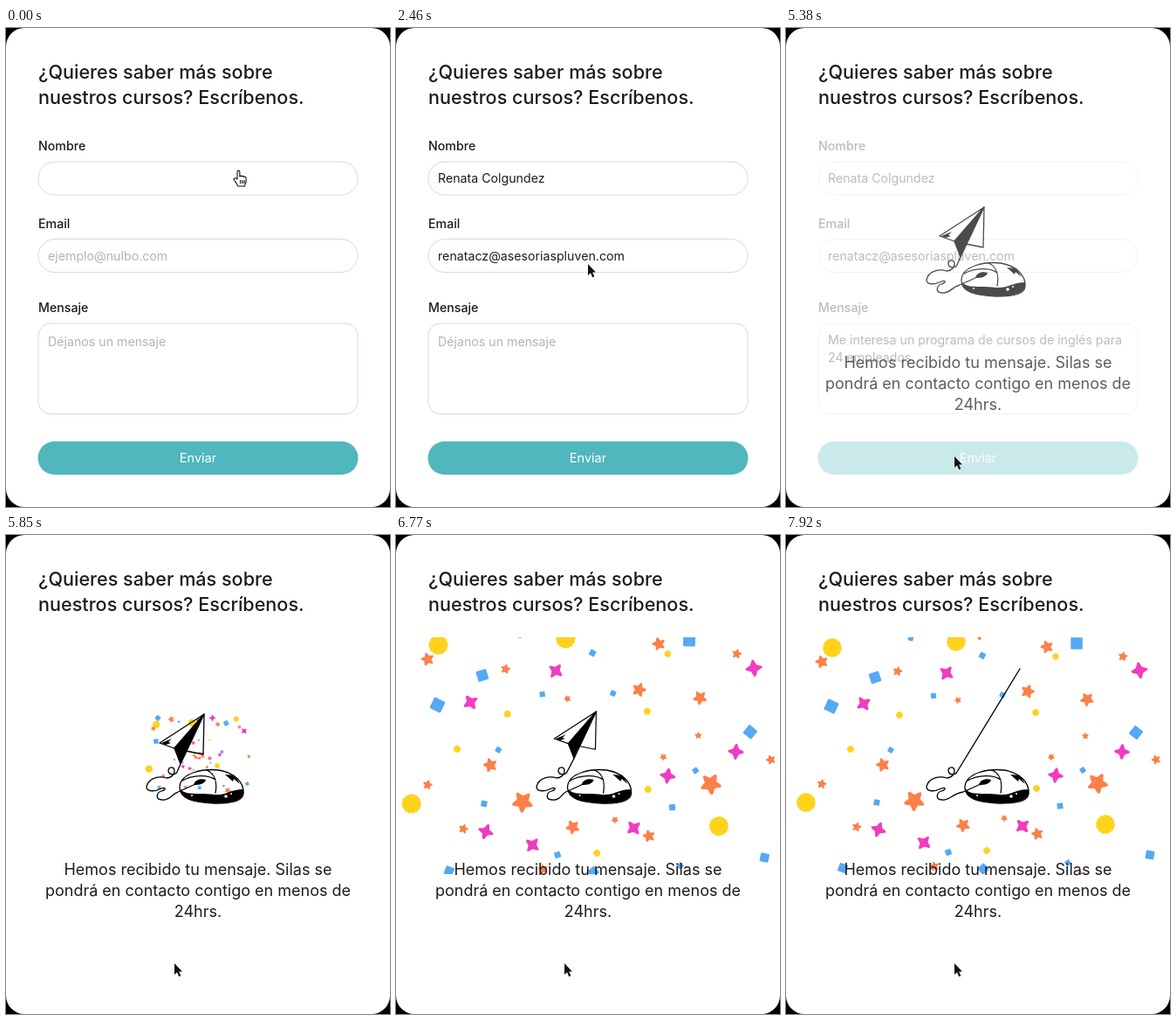
These frames come from a looping animation (440 px wide and 548 px high, 8000 ms). An HTML page:

```html
<!DOCTYPE html>
<html lang="es">
<head>
<meta charset="utf-8">
<style>
  html, body { margin: 0; width: 100%; height: 100%; overflow: hidden; background: #000; }
  svg { display: block; width: 100%; height: 100%; }
  text { font: 14.2px Inter, "Open Sans", sans-serif; fill: #1c1c1e; }
  .title { font-size: 21.6px; font-weight: 500; }
  .label { font-weight: 500; }
  .hint { fill: #b3b3b3; }
  .send { font-size: 14.5px; fill: #fff; text-anchor: middle; }
  .thanks { font-size: 18px; text-anchor: middle; }
  .field { fill: #fff; stroke: #d9d9d9; }
  .ink { fill: none; stroke: #000; stroke-width: 1.3; stroke-linejoin: round; stroke-linecap: round; }
  .solid { fill: #000; }
</style>
</head>
<body>
<svg viewBox="0 0 440 548">
  <defs><clipPath id="artClip"><rect y="117" width="440" height="271"/></clipPath></defs>
  <rect width="440" height="548" rx="21" fill="#fff"/>
  <text class="title" x="37" y="58">¿Quieres saber más sobre</text>
  <text class="title" x="37" y="87">nuestros cursos? Escríbenos.</text>

  <g id="form">
    <text class="label" x="37" y="140">Nombre</text>
    <text class="label" x="37" y="229">Email</text>
    <text class="label" x="37" y="325">Mensaje</text>
    <rect class="field" x="37" y="153" width="366" height="38" rx="19"/>
    <rect class="field" x="37" y="241.5" width="366" height="38" rx="19"/>
    <rect class="field" x="37" y="338" width="366" height="103.500" rx="14"/>
    <text id="name" x="48" y="177">Renata Colgundez</text>
    <text id="emailHint" class="hint" x="48" y="265.500">ejemplo@nulbo.com</text>
    <text id="email" x="48" y="265.500">renatacz@asesoriaspluven.com</text>
    <text id="messageHint" class="hint" x="48" y="363.500">Déjanos un mensaje</text>
    <g id="message">
      <text x="48" y="362">Me interesa un programa de cursos de inglés para</text>
      <text x="48" y="381.500">24 empleados.</text>
    </g>
    <rect x="36.500" y="473" width="367" height="38" rx="19" fill="#4fb7bd"/>
    <text class="send" x="220" y="497">Enviar</text>
  </g>

  <g id="success">
    <g clip-path="url(#artClip)">
      <g id="confetti"></g>
      <path id="cord" class="ink"/>
      <g id="plane">
        <path class="ink" d="M227 205 176 238 193 244ZM227 205 226 251 206 247"/>
        <path class="ink solid" d="M227 205 193 244 200 262Z"/>
        <path class="solid" d="M178 238 190 233 186 237 189 238 183 240Z"/>
      </g>
      <g id="mouse">
        <path class="ink" d="M205 288C206 272 232 267 250 269 268 272 279 283 278 296 277 304 268 307 245 307 222 306 204 302 205 288ZM236 269C246 273 248 284 246 295M208 281C220 274 238 274 246 280"/>
        <path class="solid" d="M206 291C214 299 226 294 245 297 258 298 263 291 278 291 280 303 268 307 245 307 222 306 206 303 206 291Z"/>
        <path class="solid" d="M221 286C222 280 229 278 235 280 234 285 227 286 221 286ZM257 274 268 275 274 285 267 279 266 282Z"/>
        <g fill="#fff">
          <circle cx="258" cy="299" r="1.800"/><circle cx="264" cy="296" r="1"/><circle cx="219" cy="298" r="1"/>
        </g>
      </g>
    </g>
    <text class="thanks" x="220" y="389">Hemos recibido tu mensaje. Silas se</text>
    <text class="thanks" x="220" y="413">pondrá en contacto contigo en menos de</text>
    <text class="thanks" x="220" y="437">24hrs.</text>
  </g>

  <g id="cursor">
    <g id="hand" fill="#fff" stroke="#111" stroke-width="1.100" stroke-linejoin="round">
      <path d="M-3 1V-7.500a1.400 1.400 0 0 1 2.800 0V-2a1.400 1.400 0 0 1 2.600 0 1.300 1.300 0 0 1 2.400.6 1.300 1.300 0 0 1 2.300.8V3c0 3-1.600 4-1.600 6H-2.300C-3 6-6 3.500-6.800 1.200-7.200-.6-4.600-.8-3 1Z"/>
      <path d="M.5 2V6M2.800 2V6M5 2V6"/>
    </g>
    <path id="arrow" d="M-3-8V5l3-2.800 2.200 5 2.200-1L2.200 1.400H6Z" fill="#111" stroke="#fff" stroke-width="1" paint-order="stroke"/>
  </g>
</svg>

<script>
const LOOP = 8000, BURST_START = 5540, BURST_LENGTH = 1310;
const CENTER = { x: 220, y: 252 };
const $ = id => document.getElementById(id);
const show = (id, visible) => $(id).setAttribute('visibility', visible ? 'inherit' : 'hidden');
const move = (el, x, y, rest = '') => el.setAttribute('transform', `translate(${x} ${y}) ${rest}`);
const linear = k => k;
const smooth = k => (1 - Math.cos(Math.PI * k)) / 2;

// Value at time t along [time, value] keys
function track(t, keys, ease = linear) {
  if (t <= keys[0][0]) return keys[0][1];
  for (let i = 1; i < keys.length; i++) {
    const [t0, a] = keys[i - 1], [t1, b] = keys[i];
    if (t < t1) return a + (b - a) * ease((t - t0) / (t1 - t0));
  }
  return keys[keys.length - 1][1];
}

function starPath(points, inner) {
  const corners = Array.from({ length: points * 2 }, (_, i) => {
    const a = i * Math.PI / points, r = i % 2 ? inner : 8.5;
    return `${(r * Math.sin(a)).toFixed(2)} ${(-r * Math.cos(a)).toFixed(2)}`;
  });
  return `M${corners.join('L')}Z`;
}

const KINDS = {
  yellow: { color: '#ffd21c', path: starPath(14, 7.8) },
  blue: { color: '#55a9f5', path: starPath(4, 6) },
  orange: { color: '#fb8148', path: starPath(5, 4) },
  pink: { color: '#f03cc0', path: starPath(4, 3.6) }
};

// Each wave: its spread over time, then [kind, radius, "x,y ..."] at full spread
const WAVES = [
  { spread: [0, .285, .503, .93, 1, 1.04], pieces: [
    ['yellow', 11, '53,129 195,122 23,306'], ['yellow', 8, '373,107'],
    ['blue', 9, '52,196 333,124 59,103'], ['blue', 6.5, '417,366 226,382 65,381'], ['blue', 4, '143,118 323,375'],
    ['orange', 7.5, '41,145 299,128 221,113'], ['orange', 9, '113,108 339,393'],
    ['orange', 5.5, '386,139 424,257 81,334 170,379'], ['pink', 9.5, '405,155 278,103']] },
  { spread: [0, .15, .37, .912, 1, 1.04], pieces: [
    ['yellow', 11, '366,331'], ['yellow', 3.8, '309,139'],
    ['blue', 8, '102,163 401,226'], ['blue', 4.5, '225,138 104,306 314,310 186,363'],
    ['orange', 5.5, '128,156 41,285'], ['orange', 7, '288,342'],
    ['pink', 8.8, '89,193 184,158 385,248 309,275 106,337 158,352']] },
  { spread: [0, .04, .2, .895, 1, 1.04], pieces: [
    ['yellow', 4, '130,206 74,245 286,203 287,290 230,361'],
    ['blue', 4, '248,183 169,184 120,246 340,269'],
    ['orange', 8, '277,179 345,188 111,263 203,332'], ['orange', 12, '147,304 357,284'],
    ['orange', 4, '197,189 343,230 304,254 250,324'], ['pink', 8.8, '271,333']] }
];
const AGES = [0, 310, 530, 840, 1070, BURST_LENGTH];

const confetti = [];
for (const wave of WAVES) {
  const keys = wave.spread.map((s, i) => [AGES[i], s]);
  for (const [kind, radius, spots] of wave.pieces) for (const spot of spots.split(' ')) {
    const [x, y] = spot.split(',').map(Number);
    const { color, path } = KINDS[kind];
    const el = document.createElementNS('http://www.w3.org/2000/svg', 'path');
    const look = { d: path, fill: color, stroke: color, 'stroke-width': 3, 'stroke-linejoin': 'round' };
    for (const name in look) el.setAttribute(name, look[name]);
    $('confetti').append(el);
    confetti.push({ el, keys, radius, dx: x - CENTER.x, dy: y - CENTER.y, turn: x * 37 + y * 11 });
  }
}

function drawConfetti(t) {
  const age = (t - BURST_START) % BURST_LENGTH;
  show('confetti', t > BURST_START);
  for (const p of confetti) {
    const s = track(age, p.keys);
    const size = s < .02 ? 0 : p.radius / 10 * (.15 + .85 * s);
    move(p.el, CENTER.x + p.dx * s, CENTER.y + p.dy * s, `rotate(${p.turn + 40 * s}) scale(${size})`);
  }
}

function drawArt(t) {
  const flight = track(t, [[6650, 0], [7150, 1]], k => k * k);
  const tipX = 200 + 68 * flight, tipY = 262 - 109 * flight;
  const shift = track(t, [[5500, -4], [5850, -6], [6380, -9], [6700, -9], [7150, 0]], smooth);
  move($('plane'), tipX, tipY, `scale(${1 - flight}) translate(-200 -262)`);
  move($('mouse'), shift, 0);
  $('cord').setAttribute('d', `M${tipX} ${tipY}L196 271C194 275 187 275 186 270 186 265 193 264 193 270
    193 275 188 278 184 278 176 275 163 278 161 288 161 295 172 293 178 290 183 288 184 291 178 293
    172 295 171 303 179 303 188 304 190 296 ${203 + shift} 294L${223 + shift} 285`);
}

function drawCursor(t) {
  const x = track(t, [[1380, 268], [1850, 226.5], [2370, 226.5], [2850, 185.5], [3390, 185.5], [4150, 196]], smooth);
  const y = track(t, [[1380, 172], [1850, 270], [2370, 270], [2850, 364], [3390, 364], [4150, 498]], smooth);
  const within = spans => spans.some(([from, to]) => t >= from && t < to);
  const hand = within([[0, 1080], [1850, 2230], [2850, 3230], [4140, 5230]]);
  const pressed = within([[80, 1080], [2150, 2230], [3150, 3230], [4380, 5150]]);
  show('hand', hand);
  show('arrow', !hand);
  move($('cursor'), x, y, `scale(${pressed ? .92 : 1})`);
}

function draw(t) {
  show('name', t >= 1080);
  show('emailHint', t < 2150);
  show('email', t >= 2150);
  show('messageHint', t < 3150);
  show('message', t >= 3150);
  const sent = track(t, [[5190, 0], [5460, 1]]);
  $('form').setAttribute('opacity', 1 - sent);
  $('success').setAttribute('opacity', sent);
  drawConfetti(t);
  drawArt(t);
  drawCursor(t);
}

const start = performance.now();
function frame() {
  draw((performance.now() - start) % LOOP);
  requestAnimationFrame(frame);
}
frame();
</script>
</body>
</html>
```
